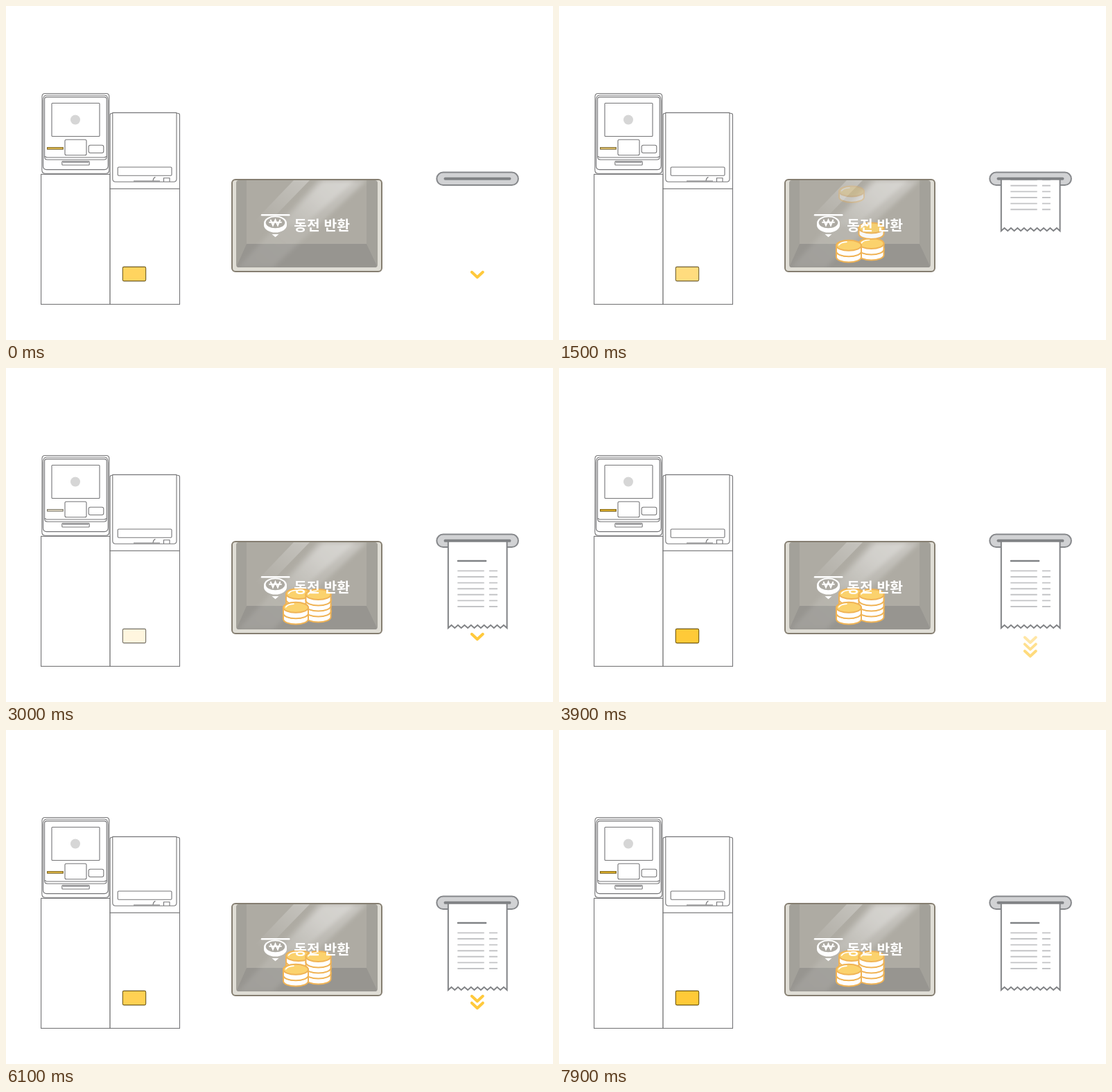
These frames come from a looping animation (789 px wide and 483 px high, 8000 ms). An HTML page:

```html
<!DOCTYPE html>
<html lang="ko">
<head>
<meta charset="utf-8">
<title>동전 반환</title>
<style>
html, body { margin: 0; width: 100%; height: 100%; overflow: hidden; background: #fff; }
svg { display: block; width: 789px; height: 483px; }
.line { fill: #fff; stroke: #757577; stroke-width: 1.1; }
.label { font: 700 20.4px "Noto Sans CJK KR", "Noto Sans CJK", sans-serif; fill: #fff; }
</style>
</head>
<body>
<svg viewBox="0 0 789 483">
  <defs>
    <linearGradient id="wide" gradientUnits="userSpaceOnUse" x1="490" y1="252" x2="370" y2="378">
      <stop offset="0" stop-color="#fff" stop-opacity=".3"/>
      <stop offset=".5" stop-color="#fff" stop-opacity=".13"/>
      <stop offset="1" stop-color="#fff" stop-opacity=".1"/>
    </linearGradient>
    <linearGradient id="thin" gradientUnits="userSpaceOnUse" x1="430" y1="252" x2="370" y2="320">
      <stop offset="0" stop-color="#fff" stop-opacity=".28"/>
      <stop offset="1" stop-color="#fff" stop-opacity="0"/>
    </linearGradient>
    <filter id="soft"><feGaussianBlur stdDeviation="3"/></filter>
    <clipPath id="inner"><rect x="332" y="252" width="204" height="126" rx="4"/></clipPath>
    <clipPath id="below"><rect x="630" y="250" width="100" height="150"/></clipPath>
    <g id="coin" stroke="#f0b355" stroke-width="2">
      <path d="M-18 0V8.5A18 7.5 0 0 0 18 8.5V0Z" fill="#fff"/>
      <ellipse rx="18" ry="7.5" fill="#fbd26d"/>
      <path d="M-14.5 -.5Q-12 -4.6 -3 -5.2" fill="none" stroke="#fff" stroke-width="1.6" stroke-linecap="round"/>
    </g>
    <path id="chevron" d="M-8 -4L0 3.5L8 -4" fill="none" stroke="#ffc93c" stroke-width="4" stroke-linecap="round" stroke-linejoin="round"/>
  </defs>

  <!-- kiosk -->
  <g class="line">
    <rect x="50.6" y="243.4" width="99.5" height="188"/>
    <rect x="150.1" y="264.3" width="100.4" height="167.1"/>
    <path d="M150.1 264.3V157.5Q150.1 155.3 152.5 155.3H248Q250.5 155.3 250.5 157.5V264.3Z"/>
    <path d="M153.8 154.4H246V250Q246 254.2 242 254.2H158Q153.8 254.2 153.8 250Z"/>
    <rect x="161.2" y="233" width="77.8" height="12.2" rx="1.5"/>
    <path d="M184 253H222M212 253Q212.5 248 215.5 247.6M227.5 254V248.8H236V254" fill="none"/>
    <path d="M52 131Q52 126.5 56.5 126.5H144.5Q148.8 126.5 148.8 131V237Q148.8 242.3 143.5 242.3H57Q51.8 242.3 51.8 237Z"/>
    <path d="M53.5 137Q53.5 129 58.5 129H142Q147.2 129 147.2 137V231Q147.2 236.6 142 236.6H58.5Q53.5 236.6 53.5 231Z"/>
    <path d="M55.6 135Q55.6 131.6 59 131.6H141.8Q145.2 131.6 145.2 135V218.5Q145.2 222.2 141 222.2H60Q55.6 222.2 55.6 218.5Z"/>
    <path d="M56 217.5Q57.5 219 60 219H141Q143.5 219 145 217.5" fill="none"/>
    <rect x="66" y="140.5" width="69" height="48" rx="1"/>
    <rect x="85" y="193.3" width="31" height="22.5" rx="2"/>
    <rect x="119.2" y="201.3" width="21.6" height="11.2" rx="2.5"/>
    <rect x="80.8" y="224.6" width="39.4" height="5.4" rx="1"/>
    <path d="M82 226.3H119" fill="none"/>
    <rect x="59.6" y="204.6" width="22.6" height="2.4"/>
    <rect x="168.4" y="377.4" width="33.2" height="20.2" rx="1.5"/>
  </g>
  <circle cx="100" cy="164.5" r="7" fill="#d6d6d6"/>
  <g id="glow" fill="#ffca38" stroke="#80640f" stroke-width="1.1">
    <rect x="59.6" y="204.6" width="22.6" height="2.4"/>
    <rect x="168.4" y="377.4" width="33.2" height="20.2" rx="1.5"/>
  </g>

  <!-- coin tray -->
  <rect x="326" y="251" width="216" height="133" rx="5" fill="#dfddd5" stroke="#857e71" stroke-width="2"/>
  <g clip-path="url(#inner)">
    <rect x="332" y="252" width="204" height="126" fill="#a3a19a"/>
    <rect x="347" y="252" width="173" height="92" fill="#aeaba3"/>
    <path d="M347 344H520L536 378H332Z" fill="#979590"/>
    <path d="M450 252H520L385 378H335Z" fill="url(#wide)" filter="url(#soft)"/>
    <path d="M415 252H438L372 320H350Z" fill="url(#thin)"/>
    <path d="M458 252H505L428 318H395Z" fill="url(#thin)" filter="url(#soft)"/>
  </g>
  <g id="coins"></g>
  <path d="M369 302.2H408.3" stroke="#fff" stroke-width="2.4" stroke-linecap="round"/>
  <path d="M372 314A16.5 10.5 0 0 1 405 314V317A16.5 10.5 0 0 1 372 317Z" fill="#fff"/>
  <ellipse cx="388.5" cy="313.3" rx="13.8" ry="8" fill="#adaaa3"/>
  <path d="M381.5 308.8L385 317.3L388.5 309.3L392 317.3L395.5 308.8M379.3 312.8H397.7" fill="none" stroke="#fff" stroke-width="2"/>
  <path d="M383.5 330H393.5L388.5 334.2Z" fill="#fff"/>
  <text class="label" x="415.3" y="324.6">동전 반환</text>

  <!-- receipt -->
  <rect x="621.3" y="240.5" width="117.6" height="18.6" rx="9.3" fill="#d1d2d4" stroke="#86888b" stroke-width="2"/>
  <g clip-path="url(#below)"><g id="receipt" fill="none">
    <path id="paper" fill="#fff" stroke="#808285" stroke-width="2"/>
    <path d="M652 279H692" stroke="#808285" stroke-width="2.6" stroke-linecap="round"/>
    <path id="rows" stroke="#c3c4c6" stroke-width="1.9"/>
  </g></g>
  <path d="M633.5 249.7H726.5" stroke="#808285" stroke-width="4" stroke-linecap="round"/>
  <g id="arrows"></g>
</svg>
<script>
const LOOP = 8000, STEP = 100;
const $ = id => document.getElementById(id);
const clamp = v => Math.max(0, Math.min(1, v));
const span = (t, a, b) => clamp((t - a) / (b - a));
const ease = p => p < .5 ? 2 * p * p : 1 - 2 * (1 - p) ** 2;

function addUse(parent, name) {
  const el = document.createElementNS("http://www.w3.org/2000/svg", "use");
  el.setAttribute("href", "#" + name);
  $(parent).append(el);
  return el;
}
function place(el, x, y, alpha) {
  el.setAttribute("transform", `translate(${x} ${y})`);
  el.setAttribute("opacity", alpha);
}

// [x, resting y, start of the drop in seconds], back to front
const coins = [
  [422, 333.5, 1.35], [422, 326.5, 1.9],
  [450.5, 351.5, .3], [450.5, 343.5, .87], [450.5, 335.5, 1.15], [450.5, 327.5, 1.9],
  [418, 354.5, .1], [418, 346.3, .6]
].map(c => [...c, addUse("coins", "coin")]);

// [appears, fade begins, fade ends] within each run
const arrows = [[0, .55, 1.2], [.1, .6, 1.3], [.2, .65, 1.4]]
  .map(a => [...a, addUse("arrows", "chevron")]);

const glow = [[0, .8], [.87, .08], [1.9, 1], [2.92, .08], [3.9, 1], [4.9, .08], [5.95, 1], [6.93, .08], [7.9, 1], [8, .95]];

const TEETH = 9, LEFT = 637.8, WIDTH = 84.8;
let paper = `M${LEFT} 240V376`;
for (let i = 1; i <= TEETH * 2; i++) {
  paper += `L${LEFT + WIDTH * i / TEETH / 2} ${i % 2 ? 371.8 : 376}`;
}
$("paper").setAttribute("d", paper + "V240");

let rows = "";
for (let i = 0; i < 7; i++) rows += `M651.3 ${293.4 + i * 8.6}h38.4m7.2 0h12`;
$("rows").setAttribute("d", rows);

function glowAt(t) {
  const i = glow.findIndex(g => g[0] > t);
  const [a, va] = glow[i - 1], [b, vb] = glow[i];
  return va + (vb - va) * span(t, a, b);
}

function draw(t) {
  $("glow").setAttribute("opacity", glowAt(t));
  for (const [x, y, start, el] of coins) {
    const p = span(t, start, start + .5);
    place(el, x, y - 80 * (1 - ease(p)), clamp(p * 1.5 - .13));
  }
  const out = span(t, .12, 2.42);
  $("receipt").setAttribute("transform", `translate(0 ${-127 * (1 - out)})`);
  $("receipt").setAttribute("visibility", out > 0 ? "visible" : "hidden");

  const run = t % 3, drift = 5.5 * span(run, .3, 1);
  arrows.forEach(([show, from, to, el], i) => {
    const on = run >= show - .001;
    place(el, 679.8, 388.8 + i * 9.9 + drift, on ? 1 - span(run, from, to) : 0);
  });
}

function frame() {
  const now = performance.now() % LOOP;
  draw(Math.floor(now / STEP) * STEP / 1000);
  requestAnimationFrame(frame);
}
draw(0);
requestAnimationFrame(frame);
</script>
</body>
</html>
```
